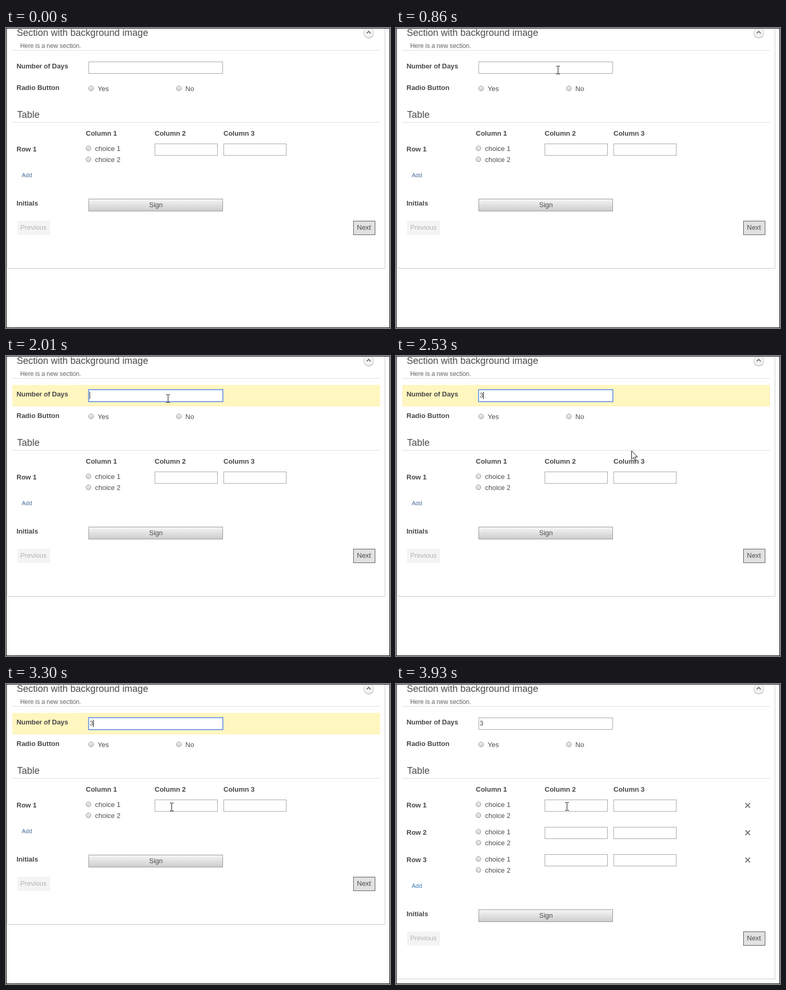
An HTML page for the animation above (4550 ms loop, 731 by 571 pixels).

```html
<!DOCTYPE html>
<html lang="en">
<head>
<meta charset="utf-8">
<title>Form with table</title>
<style>
html, body { margin: 0; width: 100%; height: 100%; overflow: hidden; background: #fff; }
svg { display: block; width: 731px; height: 571px; }
text { font: 13px "Liberation Sans", Arial, sans-serif; fill: #4c4c4c; white-space: pre; }
.b { font-weight: bold; fill: #484848; }
.h { font-size: 18px; }
.note { font-size: 12px; letter-spacing: -.1px; fill: #666; }
.add { font-size: 11px; }
.off { fill: #b4b4b4; }
.mid { text-anchor: middle; }
.tight { letter-spacing: -.1px; }
</style>
</head>
<body>
<svg id="stage" viewBox="0 0 731 571" xmlns="http://www.w3.org/2000/svg"></svg>
<script>
const LOOP = 4550, ROWS_AT = 3930, ROW_H = 52;

const text = (x, y, s, cls = '') => `<text x="${x}" y="${y}" class="${cls}">${s}</text>`;
const box = (x, y, w, h, stroke, fill = '#fff') =>
  `<rect x="${x + .5}" y="${y + .5}" width="${w - 1}" height="${h - 1}" fill="${fill}" stroke="${stroke}"/>`;
const input = (x, y, w) => box(x, y, w, 23, '#a6a6a6');
const radio = (x, y, label) =>
  `<circle cx="${x}" cy="${y}" r="4.6" fill="url(#knob)" stroke="#9a9a9a"/>` + text(x + 12.5, y + 4.5, label);
const dots = y => `<path d="M12 ${y}.5H712" stroke="#bdbdbd" stroke-dasharray="1 1"/>`;

const row = i => {
  const y = i * ROW_H;
  return text(20, 235 + y, 'Row ' + (i + 1), 'b')
    + radio(157, 229 + y, 'choice 1') + radio(157, 250 + y, 'choice 2')
    + input(283, 220 + y, 120) + input(414, 220 + y, 120);
};
const cross = i => `<path d="M665 ${226.5 + i * ROW_H}l9 9m0 -9l-9 9" stroke="#777" stroke-width="2"/>`;

const defs = `<defs>
  <linearGradient id="knob" x2="0" y2="1"><stop stop-color="#eee"/><stop offset="1" stop-color="#d4d4d4"/></linearGradient>
  <linearGradient id="btn" x2="0" y2="1"><stop stop-color="#f6f6f6"/><stop offset="1" stop-color="#cdcdcf"/></linearGradient>
</defs>`;

const header = text(20.5, 15, 'Section with background image', 'h')
  + text(27, 38, 'Here is a new section.', 'note') + dots(42)
  + `<circle cx="690.5" cy="10" r="10" fill="#bbb" opacity=".7"/>
     <circle cx="690.5" cy="8.5" r="9.5" fill="#f4f4f4" stroke="#d2d2d2"/>
     <path d="M686.7 10.2l3.8 -3.8l3.8 3.8" fill="none" stroke="#777" stroke-width="2"/>`;

const fields = text(20, 77, 'Number of Days', 'b tight') + input(157, 64, 256)
  + `<g id="focus">${box(156, 63, 258, 25, '#94b4e6')}${box(157, 64, 256, 23, '#5f8fd8')}</g>`
  + text(159, 79, '3').replace('<text', '<text id="value"')
  + '<rect id="caret" y="68" width="1" height="14" fill="#222"/>'
  + text(20, 118, 'Radio Button', 'b') + radio(162, 115, 'Yes') + radio(329, 115, 'No');

const table = text(21, 171, 'Table', 'h') + dots(179)
  + [1, 2, 3].map(n => text(21 + 131 * n, 205, 'Column ' + n, 'b')).join('')
  + row(0) + `<g id="extra">${row(1)}${row(2)}${[0, 1, 2].map(cross).join('')}</g>`;

const footer = `<g id="footer">`
  + text(30, 284, 'Add', 'add').replace('<text', '<text id="add"')
  + text(20, 338, 'Initials', 'b')
  + box(157, 325, 256, 24, '#999', 'url(#btn)') + text(285.5, 341, 'Sign', 'mid')
  + '<rect x="21" y="367" width="63" height="27" fill="#f4f4f4"/>' + text(27, 384, 'Previous', 'off')
  + box(661, 367, 42, 27, '#5a5a5e', '#e1e1e1') + text(668, 384, 'Next')
  + '</g>';

const arrow = `<path id="arrow" d="M.5 .5V16.6L4.2 13.1L6.7 18.9L9 17.9L6.5 12.2H11.7Z" fill="#fff" stroke="#111"/>`;
const beam = `<path id="beam" d="M0 .5h3m1 0h3M3.5 1v14M0 15.5h3m1 0h3" fill="none" stroke="#111"/>`;

document.getElementById('stage').innerHTML = defs
  + '<rect width="731" height="571" fill="#fff"/>'
  + '<path id="panel" fill="none" stroke="#cbcbcb"/>'
  + '<rect id="mark" x="12" y="55" width="700" height="41" fill="#fff6c0"/>'
  + header + fields + table + footer
  + box(0, 0, 731, 571, '#000', 'none') + arrow + beam;

// Pointer steps: time, shape, left, top
const pointer = [
  [0, '', 0, 0],
  [70, 'arrow', 628, 545], [145, 'arrow', 560, 425], [220, 'arrow', 476, 285],
  [295, 'arrow', 398, 165], [370, 'arrow', 343, 92], [445, 'arrow', 311, 49],
  [520, 'beam', 316, 57], [620, 'beam', 310, 60], [690, 'beam', 306, 63],
  [860, 'beam', 305, 72], [1400, 'beam', 305, 73],
  [2320, 'arrow', 322, 96], [2390, 'arrow', 372, 140], [2460, 'arrow', 448, 180],
  [2540, 'arrow', 530, 195], [2610, 'arrow', 584, 186], [2690, 'arrow', 570, 172],
  [2770, 'arrow', 512, 164], [2840, 'arrow', 447, 166],
  [2900, 'arrow', 392, 172], [2990, 'arrow', 348, 182], [3090, 'arrow', 318, 206],
  [3160, 'arrow', 308, 244], [3240, 'beam', 312, 226], [3320, 'beam', 319, 230],
  [3400, 'beam', 322, 231], [3470, 'beam', 322, 228], [3530, 'beam', 322, 225]
];
// Caret steps: time, left edge (0 = hidden)
const blink = [[0, 0], [920, 159], [1470, 0], [2010, 159], [2170, 166], [2690, 0], [3240, 166], [3760, 0]];

const el = id => document.getElementById(id);
const show = (id, on) => el(id).setAttribute('visibility', on ? 'visible' : 'hidden');
const at = (steps, t) => steps.reduce((cur, s) => s[0] <= t ? s : cur);

function draw(t) {
  const more = t >= ROWS_AT, shift = more ? 2 * ROW_H : 0, active = t >= 920 && !more;
  show('mark', active);
  show('focus', active);
  show('value', t >= 2170);
  show('extra', more);
  el('footer').setAttribute('transform', `translate(0 ${shift})`);
  el('add').style.fill = more ? '#337ab7' : '#4a6f9c';
  el('panel').setAttribute('d', `M2.5 0V${457.5 + shift}H721.5V0`);

  const caretX = at(blink, t)[1];
  show('caret', caretX);
  el('caret').setAttribute('x', caretX);

  const [, shape, x, y] = at(pointer, t);
  for (const id of ['arrow', 'beam']) {
    show(id, id === shape);
    el(id).setAttribute('transform', `translate(${x} ${y})`);
  }
}

const start = performance.now();
function tick(now) {
  draw(Math.max(0, now - start) % LOOP);
  requestAnimationFrame(tick);
}
draw(0);
requestAnimationFrame(tick);
</script>
</body>
</html>
```
